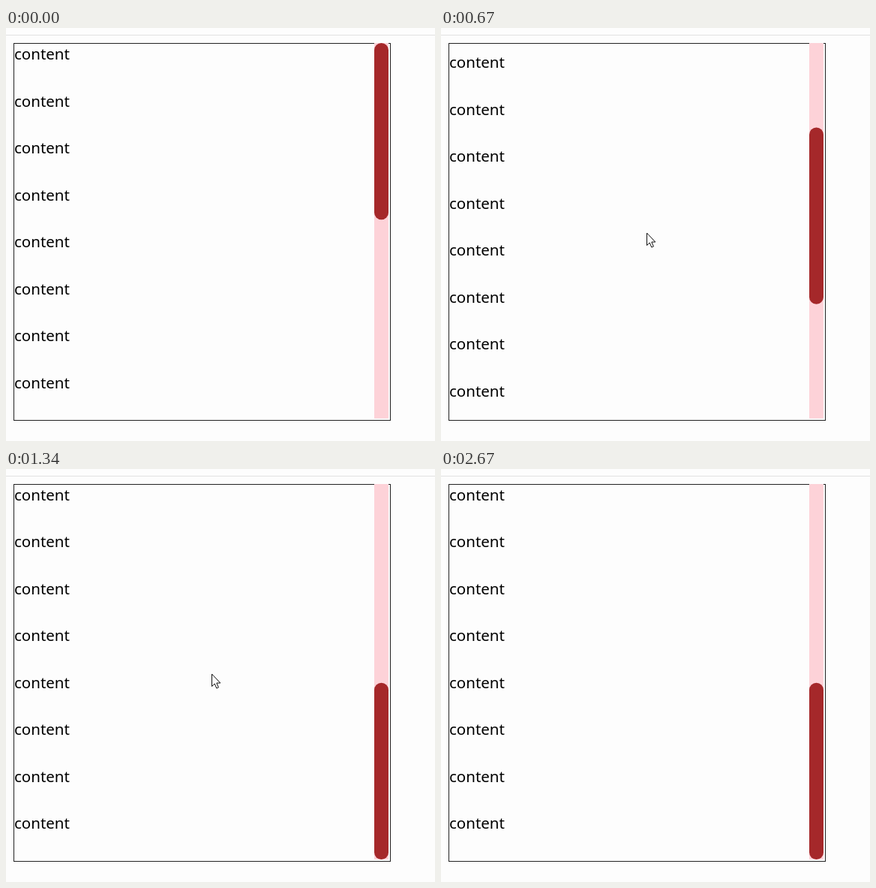
Write an HTML page that moves like this. It is 572 by 550 pixels and loops after 2.75 s.

```html
<!DOCTYPE html>
<html lang="en">
<head>
<meta charset="utf-8">
<title>Custom scrollbar</title>
<style>
html, body { margin: 0; width: 100%; height: 100%; overflow: hidden; background: #fdfdfd; }
svg { display: block; width: 572px; height: 550px; }
text { font: 20.5px "Noto Sans", "Open Sans", sans-serif; fill: #000; }
</style>
</head>
<body>
<svg viewBox="0 0 572 550">
  <clipPath id="view"><rect x="11" y="21" width="501" height="501"/></clipPath>
  <rect width="572" height="550" fill="#fdfdfd"/>
  <rect y="9" width="572" height="1" fill="#e2e2e2"/>
  <rect x="10.5" y="20.5" width="502" height="502" fill="none" stroke="#222"/>
  <g clip-path="url(#view)"><g id="rows"></g></g>
  <rect x="491" y="20" width="19" height="500" fill="#fdd2d8"/>
  <rect id="thumb" x="491" y="20" width="19" height="235.3" rx="9.5" fill="#a5282a"/>
  <path id="cursor" d="M274.5 273v16.5l3.7-3.5 2.6 6 2.6-1.1-2.6-5.9h5z" fill="#fdfdfd" stroke="#111" stroke-linejoin="round"/>
</svg>
<script>
const LOOP = 2750, ROWS = 17, PITCH = 62.5, VIEW = 500;
const CONTENT = ROWS * PITCH;
const $ = id => document.getElementById(id);
const rows = $('rows'), thumb = $('thumb'), cursor = $('cursor');

// Each wheel movement repaints at these times: [ms, scroll offset]
const SCROLL = [
  [0, 0],
  [420, 27], [460, 62], [550, 160], [590, 198], [670, 239], [750, 249], [790, 250],
  [1090, 290], [1130, 345], [1210, 464], [1260, 524], [1340, 563]
];

for (let i = 0; i < ROWS; i++) {
  const row = document.createElementNS('http://www.w3.org/2000/svg', 'text');
  row.setAttribute('x', 11);
  row.setAttribute('y', 42 + Math.round(i * PITCH));
  row.textContent = 'content';
  rows.append(row);
}

function scrollAt(t) {
  let top = 0;
  for (const [start, value] of SCROLL) if (t >= start) top = value;
  return top;
}

function draw(t) {
  const top = scrollAt(t);
  rows.setAttribute('transform', `translate(0 ${-top})`);
  thumb.setAttribute('y', 20 + Math.min(top, CONTENT - VIEW) * VIEW / CONTENT);
  cursor.setAttribute('visibility', t >= 550 && t < 1540 ? 'visible' : 'hidden');
}

const begin = performance.now();
function tick() {
  draw((performance.now() - begin) % LOOP);
  requestAnimationFrame(tick);
}
tick();
</script>
</body>
</html>
```
